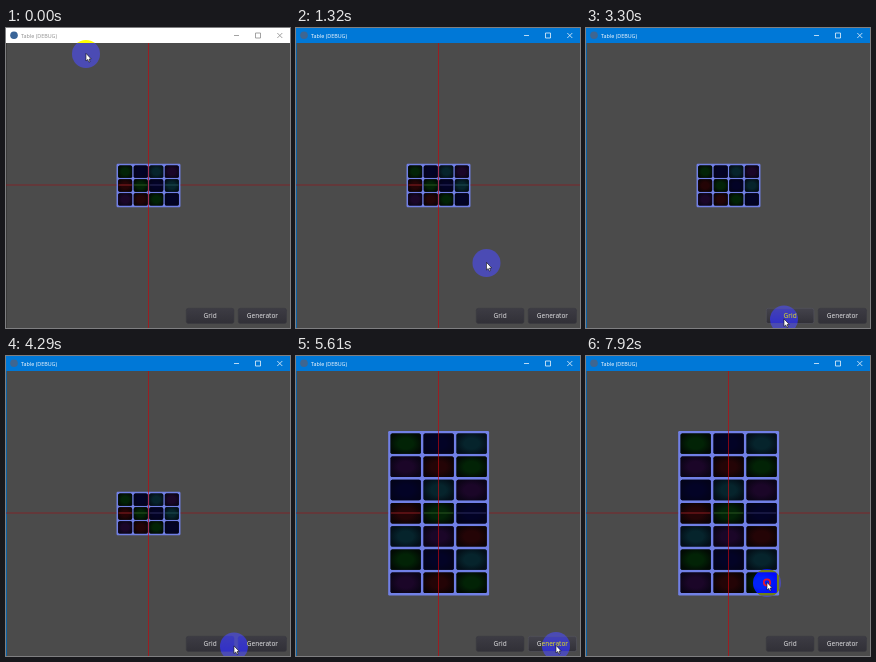
Animation, 284 px wide and 300 px high, one loop 8 s. Source, as an HTML page with a canvas:

```html
<!DOCTYPE html>
<html lang="en">
<head>
<meta charset="utf-8">
<title>Table</title>
<style>
html, body { margin: 0; width: 100%; height: 100%; overflow: hidden; background: #4b4b4b; }
canvas { display: block; width: 284px; height: 300px; }
</style>
</head>
<body>
<canvas id="stage"></canvas>
<script>
const W = 284, H = 300, LOOP = 8000, STEP = 330;
const canvas = document.getElementById('stage');
const ctx = canvas.getContext('2d');
const dpr = window.devicePixelRatio || 1;
canvas.width = W * dpr;
canvas.height = H * dpr;
ctx.scale(dpr, dpr);

// Cell colours repeat in reading order: rim, centre, axis tint.
const hues = [
  ['#020b04', '#022306', '#2a5420'],
  ['#03031a', '#030326', '#2c2c5c'],
  ['#030f18', '#06242c', '#1e4a50'],
  ['#0b0416', '#1b0628', '#46285a'],
  ['#0d0304', '#240406', '#8a1c20']
];
const small = { x: 111.4, y: 136.7, w: 62.2, h: 41.6, cols: 4, rows: 3, line: 1.7, inset: 1.1 };
const tall = { x: 93.2, y: 76, w: 98.9, h: 162.4, cols: 3, rows: 7, line: 2, inset: 1.7 };

// Pointer keys: time, x, y. The picture is sampled once per STEP.
const path = [
  [0, 80, 26], [1320, 190.5, 235], [1650, 191, 240], [2640, 198, 291],
  [3960, 198, 292], [4620, 258, 289], [4950, 260, 290], [6600, 260, 290],
  [6930, 212, 248], [7590, 186, 231], [7920, 181, 227]
];

function pointerAt(t) {
  for (let i = 1; i < path.length; i++) {
    const [t0, x0, y0] = path[i - 1], [t1, x1, y1] = path[i];
    if (t <= t1) {
      const k = (t - t0) / (t1 - t0);
      return [x0 + (x1 - x0) * k, y0 + (y1 - y0) * k];
    }
  }
  return path[path.length - 1].slice(1);
}

function rect(x, y, w, h, color) {
  ctx.fillStyle = color;
  ctx.fillRect(x, y, w, h);
}

function box(x, y, w, h, r) {
  ctx.beginPath();
  ctx.roundRect(x, y, w, h, r);
}

function disc(x, y, r, color) {
  ctx.fillStyle = color;
  ctx.beginPath();
  ctx.arc(x, y, r, 0, Math.PI * 2);
  ctx.fill();
}

function text(str, x, y, font, color, align) {
  ctx.font = font;
  ctx.fillStyle = color;
  ctx.textAlign = align;
  ctx.fillText(str, x, y);
}

function drawTitle(active) {
  rect(0, 0, W, 15, active ? '#0078d7' : '#ffffff');
  rect(0, 15, 1, H - 15, active ? '#0c61a3' : '#3a3a3a');
  disc(8, 7.3, 3.8, active ? '#3f6690' : '#3a6598');
  text('Table (DEBUG)', 15, 9.6, '5.4px "Open Sans", sans-serif', active ? '#ffffff' : '#8c8c8c', 'left');
  ctx.strokeStyle = active ? '#e8f3fc' : '#8c8c8c';
  ctx.lineWidth = 0.8;
  ctx.beginPath();
  ctx.moveTo(228, 7.5);
  ctx.lineTo(233, 7.5);
  ctx.rect(249.5, 5, 5, 5);
  ctx.moveTo(271.3, 5);
  ctx.lineTo(276.3, 10);
  ctx.moveTo(276.3, 5);
  ctx.lineTo(271.3, 10);
  ctx.stroke();
}

function drawTable(t, grid) {
  const cw = t.w / t.cols, ch = t.h / t.rows, inset = t.inset;
  box(t.x - t.line / 2, t.y - t.line / 2, t.w + t.line, t.h + t.line, 1.2);
  ctx.fillStyle = '#7180e6';
  ctx.fill();
  for (let i = 0; i < t.cols * t.rows; i++) {
    const x = t.x + (i % t.cols) * cw, y = t.y + Math.floor(i / t.cols) * ch;
    const [rim, mid, tint] = hues[i % hues.length];
    box(x + inset - 0.3, y + inset - 0.3, cw - 2 * inset + 0.6, ch - 2 * inset + 0.6, 1.6);
    ctx.fillStyle = rim;
    ctx.fill();
    ctx.save();
    ctx.clip();
    ctx.translate(x + cw / 2, y + ch / 2);
    ctx.scale(cw / 2, ch / 2);
    const glow = ctx.createRadialGradient(0, 0, 0.45, 0, 0, 1);
    glow.addColorStop(0, mid);
    glow.addColorStop(1, rim);
    ctx.fillStyle = glow;
    ctx.fillRect(-1, -1, 2, 2);
    ctx.restore();
    if (grid && y < 157 && y + ch > 157) rect(x + inset, 156.5, cw - 2 * inset, 1, tint);
  }
}

function drawGrid(t) {
  const red = 'rgba(190,10,16,.68)', dim = 'rgba(160,12,18,.58)';
  rect(142, 15, 1, H - 15, red);
  rect(0, 156.5, t.x - 1, 1, dim);
  rect(t.x + t.w + 1, 156.5, W - t.x - t.w - 1, 1, dim);
}

function drawButton(label, x, w, hover) {
  box(x, 280.3, w, 15.2, 2);
  const fill = ctx.createLinearGradient(0, 280, 0, 296);
  fill.addColorStop(0, hover ? '#44434c' : '#3d3c44');
  fill.addColorStop(1, '#313037');
  ctx.fillStyle = fill;
  ctx.fill();
  ctx.strokeStyle = hover ? '#55545f' : '#3a3940';
  ctx.lineWidth = 0.6;
  ctx.stroke();
  text(label, x + w / 2, 290.1, '6.5px "Noto Sans", sans-serif', '#dedee0', 'center');
}

function drawPointer(x, y, pressed) {
  ctx.globalCompositeOperation = 'difference';
  disc(x, y, 14, '#0000ff');
  ctx.globalCompositeOperation = 'source-over';
  if (pressed) {
    ctx.strokeStyle = '#e8142c';
    ctx.lineWidth = 1.7;
    ctx.beginPath();
    ctx.arc(x, y - 0.5, 3.2, 0, Math.PI * 2);
    ctx.stroke();
  }
  ctx.save();
  ctx.translate(x, y - 0.6);
  ctx.beginPath();
  for (const [px, py] of [[0, 0], [0, 7.6], [1.7, 6.1], [2.9, 8.7], [4.1, 8.2], [3, 5.7], [5.2, 5.5]]) ctx.lineTo(px, py);
  ctx.closePath();
  ctx.fillStyle = '#ffffff';
  ctx.fill();
  ctx.strokeStyle = '#111111';
  ctx.lineWidth = 0.6;
  ctx.stroke();
  ctx.restore();
}

function draw(now) {
  const t = Math.floor((now % LOOP) / STEP) * STEP;
  const grid = t < 2970 || t >= 3960;
  const table = t < 5280 ? small : tall;
  const [x, y] = pointerAt(t);
  const over = (left, right) => y > 280 && x > left && x < right;

  rect(0, 0, W, H, '#4b4b4b');
  drawTitle(t >= 660);
  drawTable(table, grid);
  if (grid) drawGrid(table);
  drawButton('Grid', 180.3, 47.6, over(180, 228));
  drawButton('Generator', 232.3, 48.2, over(232, 281));
  drawPointer(x, y, t === 4950 || t === 7920);
  requestAnimationFrame(draw);
}
requestAnimationFrame(draw);
</script>
</body>
</html>
```
